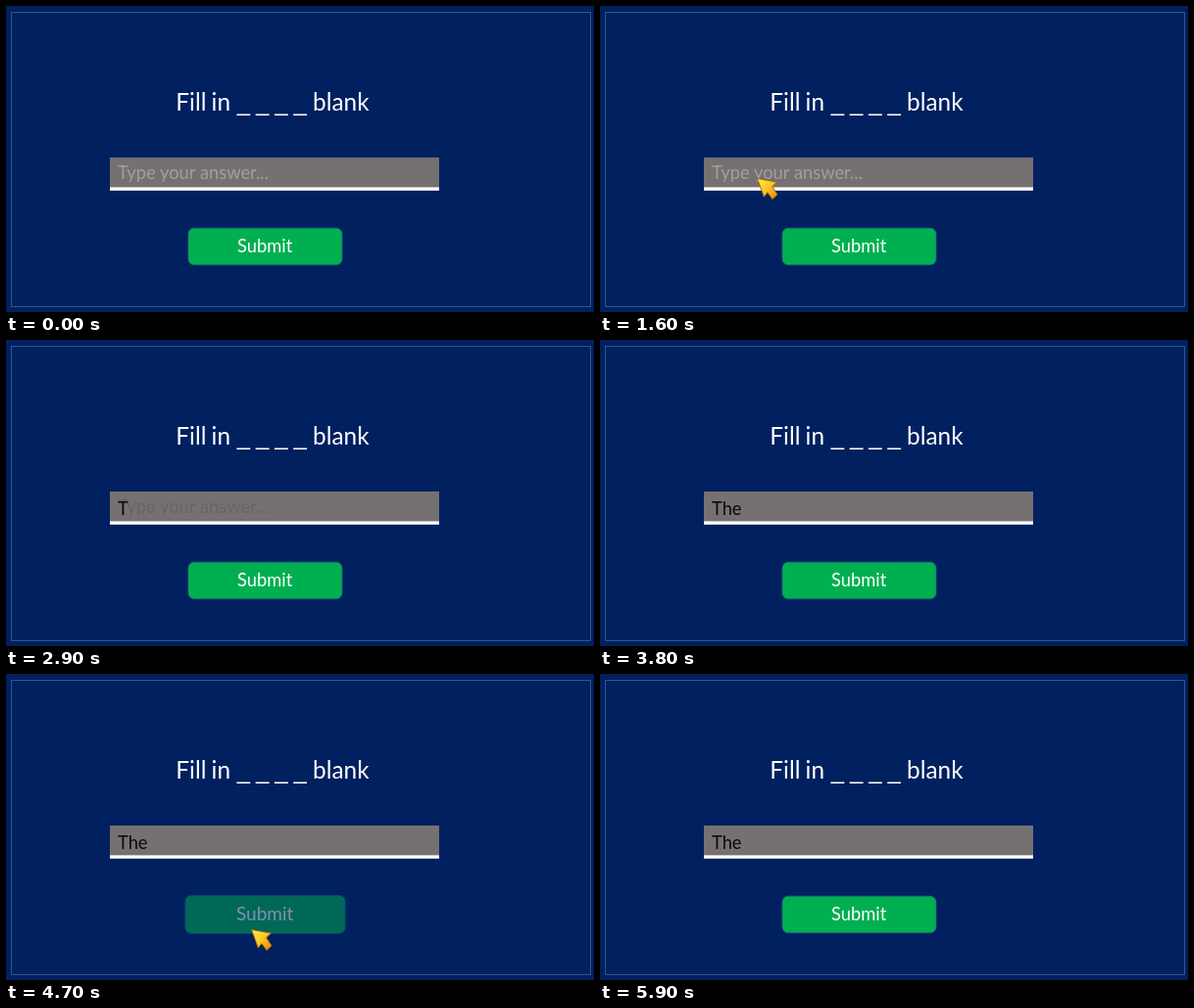
Animation, 600 px wide and 313 px high, one loop 6000 ms. Source, as an HTML page:

```html
<!DOCTYPE html>
<html>
<head>
<meta charset="utf-8">
<style>
html, body { margin: 0; height: 100%; overflow: hidden; background: #002060; }
svg { display: block; width: 100vw; height: 100vh; }
text { font: 18.3px Lato, Carlito, sans-serif; white-space: pre; }
#title text { font-size: 24.4px; fill: #fff; }
#title .gap { font: 23.9px "Liberation Sans", Arial, sans-serif; }
</style>
</head>
<body>
<svg viewBox="0 0 600 313">
  <defs>
    <linearGradient id="gold" x1="0" y1="0" x2="1" y2="1">
      <stop offset="0" stop-color="#fff04a"/>
      <stop offset=".5" stop-color="#fcc520"/>
      <stop offset="1" stop-color="#e8820c"/>
    </linearGradient>
  </defs>
  <rect width="600" height="313" fill="#002060"/>
  <rect x="5.5" y="6.5" width="591" height="301" fill="none" stroke="#31568f"/>

  <g id="title">
    <text y="107"><tspan x="173.3">Fill</tspan><tspan x="209.6">in</tspan><tspan x="313">blank</tspan></text>
    <text class="gap" x="235.7 255 274.3 293.6" y="107">____</text>
  </g>

  <rect x="106" y="155" width="336" height="31" fill="#767171"/>
  <rect x="106" y="185.4" width="336" height="3.4" fill="#fff"/>
  <text id="hint" y="177"><tspan x="114">Type</tspan><tspan x="157">your</tspan><tspan x="198">answer...</tspan></text>
  <text id="answer" x="114" y="178.5" fill="#0a0a0a"></text>

  <g id="button">
    <rect x="186" y="227.2" width="157" height="37.6" rx="6" fill="#00b050" stroke="#1f6a78" stroke-width=".8"/>
    <text x="264.2" y="251.8" text-anchor="middle" fill="#fff">Submit</text>
  </g>

  <path id="cursor" d="M0 0L20 3.6L15.2 8.2L20.6 16.4L15.4 21.2L10.4 14.2L6.8 18.8Z"
    fill="url(#gold)" stroke="#9a5a12" stroke-width=".9" stroke-linejoin="round"/>
</svg>
<script>
const $ = id => document.getElementById(id);
const part = (t, a, b) => Math.min(1, Math.max(0, (t - a) / (b - a)));
const mix = (a, b, k) => a + (b - a) * k;

function moveCursor(t) {
  const first = t < 3000, go = part(t, 700, 1568);
  const x = first ? mix(-24, 160.5, go) : 250.5;
  const y = first ? mix(169.5, 176.5, go) : 261.5;
  const shown = first
    ? 1 - part(t, 2000, 2500)
    : part(t, 3950, 4500) - part(t, 5000, 5500);
  $('cursor').setAttribute('transform', `translate(${x} ${y})`);
  $('cursor').setAttribute('opacity', shown);
}

function pulseButton(t) {
  const p = part(t, 4500, 5000), rise = 1 - Math.abs(2 * p - 1);
  const size = 1 + .05 * rise;
  $('button').setAttribute('transform',
    `translate(264.5 246) scale(${size}) translate(-264.5 -246)`);
  $('button').setAttribute('opacity', 1 - .5 * Math.min(1, rise * 2.5));
}

function draw(t) {
  const dim = part(t, 2200, 2700);
  $('hint').setAttribute('fill',
    `rgb(${mix(163, 104, dim)},${mix(158, 100, dim)},${mix(158, 100, dim)})`);
  $('hint').setAttribute('opacity', 1 - part(t, 2950, 3400));
  const letters = t < 2900 ? 0 : Math.min(3, 1 + Math.floor((t - 2900) / 300));
  $('answer').textContent = 'The'.slice(0, letters);
  moveCursor(t);
  pulseButton(t);
}

const start = performance.now();
function tick() {
  draw((performance.now() - start) % 6000);
  requestAnimationFrame(tick);
}
tick();
</script>
</body>
</html>
```
